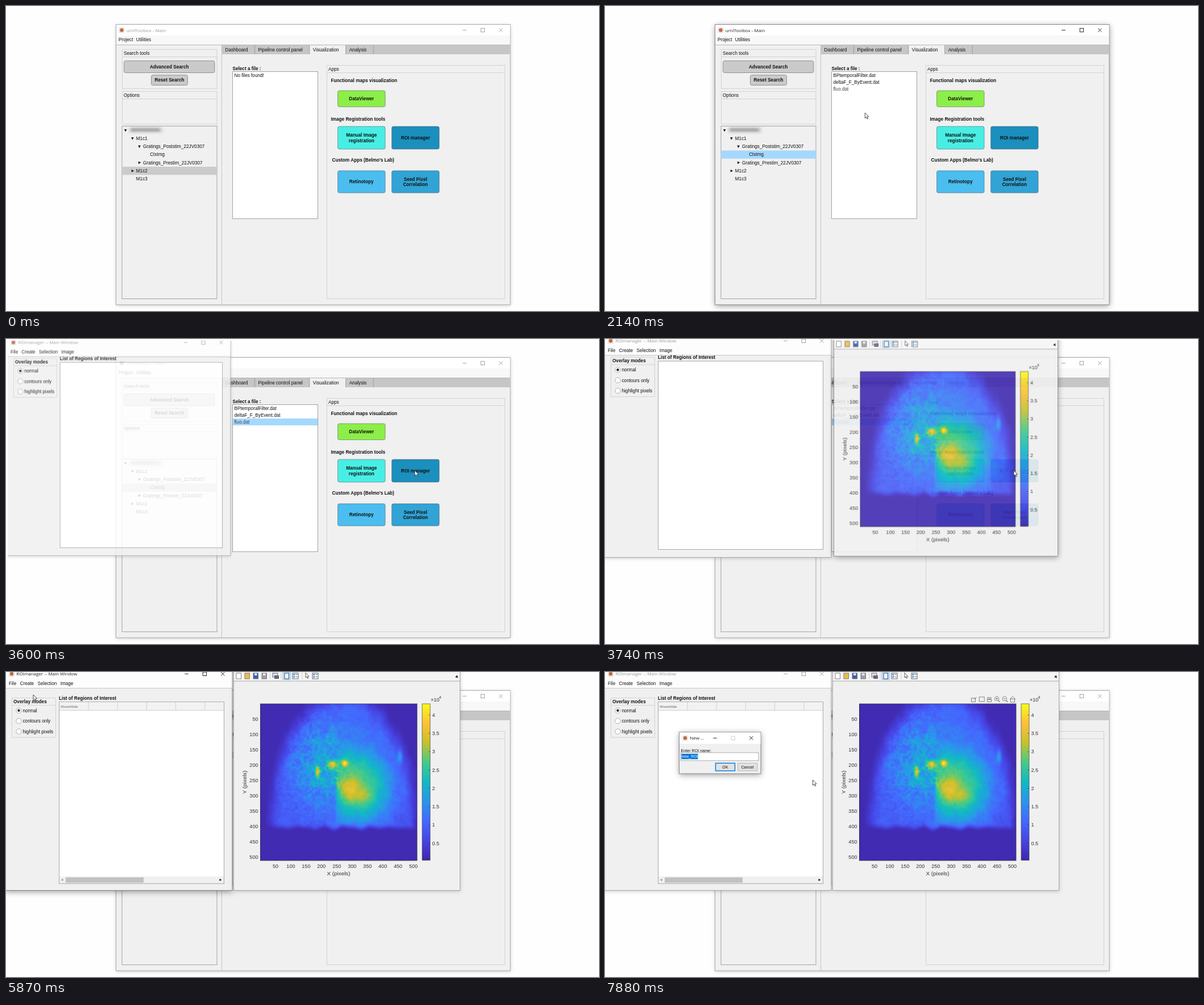
Write an HTML page with a canvas that moves like this. It is 1043 px wide and 537 px high and loops after 8000 ms.

```html
<!DOCTYPE html>
<html lang="en">
<head>
<meta charset="utf-8">
<title>Region manager walkthrough</title>
<style>
html, body { margin: 0; width: 100%; height: 100%; overflow: hidden; background: #fefefe; }
canvas { display: block; }
</style>
</head>
<body>
<canvas id="stage" width="1043" height="537"></canvas>
<script>
const W = 1043, H = 537, LOOP = 8000;
const SANS = '"Liberation Sans", Arial, sans-serif';
const TITLE = '"Open Sans", "Noto Sans", sans-serif';
const screen = document.getElementById('stage').getContext('2d');
const layer = makeCanvas(W, H).getContext('2d');
let c = screen;

// Moments (ms) at which the interface reacts.
const PICK_ROW = 1450, FILES_SHOWN = 1790, PICK_FILE = 2620, OPEN_MANAGER = 3480, OPEN_FIGURE = 3605,
  TABLE_READY = 3950, FOCUS_MANAGER = 5060, FOCUS_FIGURE = 6250, OPEN_DIALOG = 6480;
const within = (t, from, to) => t >= from && t < to;

function makeCanvas(w, h) {
  return Object.assign(document.createElement('canvas'), { width: w, height: h });
}
const clamp = v => Math.max(0, Math.min(1, v));
const smooth = v => { v = clamp(v); return v * v * (3 - 2 * v); };
const mix = (a, b, p) => a + (b - a) * p;

// ---------- drawing helpers (boxes are x, y, width, height) ----------
function fill(x, y, w, h, color) {
  c.fillStyle = color;
  c.fillRect(x, y, w, h);
}
function box(x, y, w, h, edge, color, width = 1) {
  if (color) fill(x, y, w, h, color);
  c.strokeStyle = edge;
  c.lineWidth = width;
  c.strokeRect(x, y, w, h);
}
function line(x0, y0, x1, y1, color, width = 1) {
  c.beginPath();
  c.moveTo(x0, y0);
  c.lineTo(x1, y1);
  c.strokeStyle = color;
  c.lineWidth = width;
  c.stroke();
}
// Small solid triangle pointing along an angle.
function arrow(x, y, angle, color = '#111', r = 2.8) {
  c.beginPath();
  for (const turn of [0, 2.2, -2.2]) c.lineTo(x + r * Math.cos(angle + turn), y + r * Math.sin(angle + turn));
  c.fillStyle = color;
  c.fill();
}
function circle(x, y, r, color, edge) {
  c.beginPath();
  c.arc(x, y, r, 0, 7);
  if (color) { c.fillStyle = color; c.fill(); }
  if (edge) { c.strokeStyle = edge; c.lineWidth = 0.8; c.stroke(); }
}
function text(str, x, y, { size = 8.2, bold = false, color = '#111', align = 'left', font = SANS } = {}) {
  c.font = `${bold ? 'bold ' : ''}${size}px ${font}`;
  c.textAlign = align;
  c.fillStyle = color;
  c.fillText(str, x, y + size * 0.35);
  return c.measureText(str).width;
}
function menu(x, y, gap, labels) {
  for (const label of labels) x += text(label, x, y) + gap;
}
function button(x, y, w, h, color, ...labels) {
  c.beginPath();
  c.roundRect(x, y, w, h, 3);
  c.fillStyle = color;
  c.fill();
  c.strokeStyle = 'rgba(80,90,100,.55)';
  c.lineWidth = 1;
  c.stroke();
  const first = y + h / 2 - (labels.length - 1) * 4.8;
  labels.forEach((s, i) => text(s, x + w / 2, first + i * 9.6, { bold: true, align: 'center' }));
}
function panel(x, y, w, h, title, bold) {
  box(x, y, w, h, '#d2d2d2');
  line(x, y + 13, x + w, y + 13, '#d2d2d2');
  text(title, x + 2.5, y + 6.5, { bold });
}
function windowBase(x, y, w, h, active) {
  c.save();
  c.shadowColor = `rgba(0,0,0,${active ? 0.4 : 0.22})`;
  c.shadowBlur = active ? 10 : 6;
  c.shadowOffsetY = active ? 2 : 1;
  fill(x, y, w, h, '#f0f0f0');
  c.restore();
  box(x, y, w, h, active ? '#888' : '#aaa');
}
function titleBar(x, y, title, buttonsX, active, maxColor) {
  const color = active ? '#111' : '#999', r = 3.2, gap = 31.9, cx = buttonsX + 2 * gap;
  fill(x - 5, y - 5, 10, 10, '#e4e8ee');
  circle(x, y, 3.2, '#c9693a');
  text(title, x + 8.3, y + 0.3, { size: 8, font: TITLE, color: active ? '#222' : '#999' });
  line(buttonsX - r, y, buttonsX + r, y, color, 0.9);
  box(buttonsX + gap - r, y - r, 2 * r, 2 * r, maxColor || color, null, 0.9);
  line(cx - r, y - r, cx + r, y + r, color, 0.9);
  line(cx - r, y + r, cx + r, y - r, color, 0.9);
}

// ---------- main window ----------
const TREE_TOP = 211.5, ROW = 14.3;
const tree = [
  { label: '', depth: 0, open: true },
  { label: 'M1c1', depth: 1, open: true },
  { label: 'Gratings_Poststim_22JV0307', depth: 2, open: true },
  { label: 'CtxImg', depth: 3 },
  { label: 'Gratings_Prestim_22JV0307', depth: 2, open: false },
  { label: 'M1c2', depth: 1, open: false },
  { label: 'M1c3', depth: 1 }
];
function drawTree(t, mouse) {
  const picked = t < PICK_ROW ? 5 : 3;
  const over = within(mouse.x, 204, 371) ? Math.floor((mouse.y - TREE_TOP) / ROW) : -1;
  const pickedColor = within(t, PICK_ROW, PICK_FILE) ? '#a5d8fe' : '#cbcbcb';
  box(204, TREE_TOP, 167, 304, '#a2a2a2');
  tree.forEach(({ label, depth, open }, i) => {
    const top = TREE_TOP + i * ROW, y = top + ROW / 2, x = 216.6 + depth * 12.2;
    if (i === picked || i === over) fill(204.5, top, 166, ROW, i === picked ? pickedColor : '#dcdcdc');
    if (open !== undefined) arrow(x - 6.4, y, open ? Math.PI / 2 : 0);
    text(label, x, y);
  });
  c.save();
  c.filter = 'blur(2px)';
  fill(217, 214, 58, 9, '#d2d2d2');
  fill(220, 216, 50, 4, '#949494');
  c.restore();
}
function drawTabs() {
  fill(380, 69, 506.5, 16, '#c6c6c6');
  let x = 380;
  for (const label of ['Dashboard', 'Pipeline control panel', 'Visualization', 'Analysis']) {
    c.font = `8.2px ${SANS}`;
    const width = c.measureText(label).width + 18;
    if (label === 'Visualization') fill(x, 69, width, 17, '#f0f0f0');
    text(label, x + 5.5, 77);
    x += width;
    line(x - 0.5, 69, x - 0.5, 85, '#9c9c9c');
  }
}
function drawFiles(t) {
  const border = within(t, PICK_FILE, OPEN_MANAGER) ? '#3fa9ee' : '#a2a2a2';
  const files = t < FILES_SHOWN ? ['No files found!'] : ['BPtemporalFilter.dat', 'deltaF_F_ByEvent.dat', 'fluo.dat'];
  text('Select a file :', 398.5, 110.5, { bold: true });
  box(398.5, 115.5, 150, 259, border, '#fff');
  if (t > PICK_FILE) fill(399, 140, 149, 12, '#a5d8fe');
  files.forEach((name, i) => text(name, 401.5, 122 + i * 12.1, { color: i === 2 ? '#444' : '#111' }));
}
function drawMain(t, mouse) {
  windowBase(193.5, 32.5, 693.5, 493.5, within(t, PICK_ROW, OPEN_MANAGER));
  fill(194, 33, 692.5, 19, '#fff');
  fill(194, 52, 692.5, 16, '#f8f8f8');
  titleBar(203.5, 42.5, 'umIToolbox - Main', 806.5, within(t, PICK_ROW, OPEN_MANAGER));
  menu(198, 59.5, 5.3, ['Project', 'Utilities']);
  line(194, 68.5, 886, 68.5, '#b8b8b8');

  panel(204.5, 76.5, 166.5, 69, 'Search tools');
  button(207.5, 96.5, 159.5, 21, '#cacaca', 'Advanced Search');
  button(255.5, 121.5, 64, 18, '#cacaca', 'Reset Search');
  panel(204.5, 150.5, 166.5, 57.5, 'Options');
  drawTree(t, mouse);
  line(379.5, 69, 379.5, 526, '#c4c4c4');
  drawTabs();
  drawFiles(t);

  panel(564.5, 104.5, 313, 411, 'Apps');
  const heading = (s, x, y) => text(s, x, y, { bold: true });
  const app = (column, y, h, color, ...labels) => button(583.5 + column * 95, y, 83.5, h, color, ...labels);
  const overManager = within(mouse.x, 678, 762) && within(mouse.y, 212, 252) && t < OPEN_MANAGER;
  heading('Functional maps visualization', 571.5, 131.5);
  app(0, 149, 28.5, '#8cee49', 'DataViewer');
  heading('Image Registration tools', 571.5, 199);
  app(0, 212, 40, '#48eee4', 'Manual Image', 'registration');
  app(1, 212, 40, overManager ? '#55a9cc' : '#1b8fbd', 'ROI manager');
  heading("Custom Apps (Belmo's Lab)", 573.5, 271.5);
  app(0, 290, 39, '#4bbdef', 'Retinotopy');
  app(1, 290, 39, '#31a3d5', 'Seed Pixel', 'Correlation');
}

// ---------- list window ----------
function drawTable() {
  fill(94, 53, 289, 14.5, '#f2f2f2');
  line(94, 67.5, 383, 67.5, '#d0d0d0');
  for (let x = 145; x < 383; x += 51.2) line(x, 53, x, 67, '#d0d0d0');
  text('Show/Hide', 96, 60.5, { size: 6, bold: true, color: '#888' });
  fill(94, 360, 289, 12, '#f0f0f0');
  fill(105, 361.5, 137, 9.5, '#c1c1c1');
  arrow(99, 366, Math.PI, '#999', 2.5);
  arrow(377, 366, 0, '#111', 2.5);
}
function drawManager(t) {
  const table = t > TABLE_READY, dy = table ? 13.6 : 0;
  windowBase(-2, -12, 400, 396.5, within(t, FOCUS_MANAGER, FOCUS_FIGURE));
  fill(0, 0, 397.5, 28, '#fdfdfd');
  line(0, 28.5, 398, 28.5, '#c8c8c8');
  titleBar(10, 3.3, 'ROImanager -- Main Window', 317.5, within(t, FOCUS_MANAGER, FOCUS_FIGURE));
  menu(5, 20, 6.4, ['File', 'Create', 'Selection', 'Image']);

  panel(10.5, 32 + dy, 77, 69.5, 'Overlay modes', true);
  ['normal', 'contours only', 'highlight pixels'].forEach((label, i) => {
    const y = 54.2 + dy + i * 18.5;
    circle(22.5, y, 4.7, '#fff', '#999');
    if (i === 0) circle(22.5, y, 2.2, '#222');
    text(label, 29.5, y);
  });
  text('List of Regions of Interest', 93, 32.5 + dy, { bold: true });
  box(93.5, 39 + dy, 290, table ? 320 : 331.5, '#a8a8a8', '#fff');
  if (table) drawTable();
}

// ---------- heat map ----------
const MAP = { x: 447, y: 56, size: 276 };
const colors = ['#3e26a8', '#4743e3', '#4368fd', '#2b94ec', '#10b9c4', '#45ca88', '#c6c12c', '#fec038', '#f9fb15'];
function colorRamp(ctx, x0, y0, x1, y1) {
  const ramp = ctx.createLinearGradient(x0, y0, x1, y1);
  colors.forEach((color, i) => ramp.addColorStop(i / (colors.length - 1), color));
  return ramp;
}
function hash(x, y) {
  const s = Math.sin(x * 127.1 + y * 311.7) * 43758.5453;
  return s - Math.floor(s);
}
function noise(x, y) {
  const i = Math.floor(x), j = Math.floor(y), u = smooth(x - i), v = smooth(y - j);
  return mix(mix(hash(i, j), hash(i + 1, j), u), mix(hash(i, j + 1), hash(i + 1, j + 1), u), v) - 0.5;
}
const bump = (x, y, cx, cy, rx, ry = rx) => Math.exp(-(((x - cx) / rx) ** 2) - ((y - cy) / ry) ** 2);
const rings = Array.from({ length: 9 }, (_, i) => ({
  x: 540 + 90 * (hash(i, 1) - 0.5), y: 165 + 110 * (hash(i, 2) - 0.5), r: 4 + 4 * hash(i, 3)
}));

function brightness(x, y) {
  const edge = Math.hypot((x - 592) / 130, Math.max(0, 250 - y) / 215) + noise(x / 9, y / 20) * 0.05;
  const dome = smooth((1.07 - edge) / 0.24), floor = smooth((280 - y + noise(x / 16, 1) * 6) / 14);
  const left = bump(x, y, 545, 165, 45, 75);
  // a broad glow, a textured left half and a bright disc with a sharp left edge
  let v = 0.16 + 0.17 * bump(x, y, 598, 165, 85, 95) + 0.1 * left;
  const disc = Math.hypot((x - 622) / 56, (y - 207) / 63);
  v += 0.29 * Math.exp(-(disc ** 3.2)) * smooth((x - 577) / 7);
  v += 0.17 * bump(x, y, 604, 205, 17, 22) + 0.13 * bump(x, y, 625, 218, 22, 16);
  v += 0.42 * (bump(x, y, 574, 162, 8) + bump(x, y, 547, 174, 4, 10) + bump(x, y, 595, 160, 6));
  v += 0.3 * bump(x, y, 693, 148, 4, 11);
  for (const ring of rings) {
    const gap = Math.hypot(x - ring.x, y - ring.y) - ring.r;
    v += 0.08 * Math.exp(-gap * gap);
  }
  v += 0.05 * noise(x / 14, y / 14) + (0.04 + 0.14 * left) * (noise(x / 5, y / 5) + 0.7 * noise(x / 2.5, y / 2.5));
  v += 0.7 * left * Math.max(0, noise(x / 6 + 9, y / 6) - 0.3);
  return 0.02 + dome * floor * v;
}
function paintHeatMap() {
  const palette = makeCanvas(256, 1).getContext('2d');
  palette.fillStyle = colorRamp(palette, 0, 0, 256, 0);
  palette.fillRect(0, 0, 256, 1);
  const shades = palette.getImageData(0, 0, 256, 1).data;
  const canvas = makeCanvas(MAP.size, MAP.size), g = canvas.getContext('2d');
  const img = g.createImageData(MAP.size, MAP.size);
  for (let y = 0; y < MAP.size; y++)
    for (let x = 0; x < MAP.size; x++) {
      const shade = Math.round(255 * clamp(brightness(x + MAP.x, y + MAP.y)));
      img.data.set(shades.subarray(shade * 4, shade * 4 + 4), (y * MAP.size + x) * 4);
    }
  g.putImageData(img, 0, 0);
  return canvas;
}
const heatMap = paintHeatMap();

// ---------- figure window ----------
function drawToolbar() {
  fill(401, 0, 397, 16, '#f5f5f5');
  line(401, 16, 798, 16, '#a5a5a5');
  ['#fff', '#e8bd4a', '#3f5fa8', '#a0a0a0'].forEach((color, i) => {
    const x = 405 + i * 15;
    box(x, 2, 8.5, 10, '#667', color, 0.8);
    if (i > 1) fill(x + 2, 2.5, 4.5, 3.5, '#e6ebf4');
  });
  box(469, 2, 9, 7, '#567', '#dde', 0.9);
  fill(472, 6, 8, 6, '#667');
  box(487, -1, 13.5, 14.5, '#8bbce0', '#cce4f7', 0.8);
  box(490, 2, 7.5, 10, '#246', '#eef4fa', 0.9);
  for (const x of [504, 539]) {
    box(x, 2, 10, 10, '#456', '#fff', 0.9);
    for (const y of [4.5, 8.5]) {
      fill(x + 1.5, y - 1, 2.5, 2.5, '#3579c8');
      line(x + 5, y, x + 9, y, '#555', 0.8);
    }
  }
  for (const x of [464.5, 484, 521]) line(x, 1, x, 13, '#c4c4c4', 0.8);
  drawPointer({ x: 527, y: 1.5 }, 0.9);
  arrow(793, 8.5, Math.PI / 4, '#222', 3);
}
function drawAxesTools() {
  const gray = '#777', slot = i => 648.5 + i * 13.7;
  box(slot(0) - 4, 46, 7, 6.5, gray, null, 0.9);
  line(slot(0), 49, slot(0) + 5, 44, gray);
  box(slot(1) - 4, 44, 9, 8, gray, null, 0.9);
  for (let i = 0; i < 4; i++) line(slot(2) - 3 + i * 2, 44, slot(2) - 3 + i * 2, 49, gray, 0.9);
  box(slot(2) - 3.5, 48.5, 7, 4, gray, null, 0.9);
  for (const i of [3, 4]) {
    circle(slot(i) - 0.5, 47, 3.8, null, gray);
    line(slot(i) + 2, 50, slot(i) + 5, 53, gray, 1.2);
    line(slot(i) - 2.5, 47, slot(i) + 1.5, 47, gray, 0.9);
  }
  line(slot(3) - 0.5, 45, slot(3) - 0.5, 49, gray, 0.9);
  for (const side of [-5, 5]) line(slot(5), 43, slot(5) + side, 48, gray, 0.9);
  box(slot(5) - 3.5, 47.5, 7, 5.5, gray, null, 0.9);
}
function drawFigure(t) {
  const right = MAP.x + MAP.size, bottom = MAP.y + MAP.size;
  windowBase(400.5, -40, 398, 424.5, t < FOCUS_MANAGER || within(t, FOCUS_FIGURE, OPEN_DIALOG));
  drawToolbar();
  c.drawImage(heatMap, MAP.x, MAP.y);
  box(MAP.x + 0.5, MAP.y, MAP.size - 0.5, MAP.size, '#333', null, 0.7);

  const tick = { size: 9.1, color: '#333' }, axis = { size: 9.9, color: '#333', align: 'center' };
  for (let n = 50; n <= 500; n += 50) {
    const d = n / 512 * MAP.size;
    text(n, MAP.x + d, 342, { ...tick, align: 'center' });
    text(n, 443.5, MAP.y + d, { ...tick, align: 'right' });
    line(MAP.x + d, bottom, MAP.x + d, bottom - 3, '#333', 0.7);
    line(MAP.x, MAP.y + d, MAP.x + 3, MAP.y + d, '#333', 0.7);
  }
  text('X (pixels)', (MAP.x + right) / 2, 355, axis);
  c.save();
  c.translate(420, (MAP.y + bottom) / 2);
  c.rotate(-Math.PI / 2);
  text('Y (pixels)', 0, 0, axis);
  c.restore();

  box(732, MAP.y, 14, MAP.size - 0.5, '#444', colorRamp(c, 0, bottom, 0, MAP.y), 0.7);
  for (let n = 0.5; n <= 4; n += 0.5) {
    const y = 333.8 - n * 64.5;
    text(n, 749.5, y, tick);
    line(743.5, y, 746, y, '#333', 0.7);
  }
  text('×10', 747, 48.5, tick);
  text('4', 761.5, 45, { size: 7, color: '#333' });
  if (t > FOCUS_FIGURE) drawAxesTools();
}

// ---------- name dialog ----------
function drawDialog() {
  const small = { size: 7.15 }, centered = { ...small, align: 'center' };
  windowBase(130.5, 106, 143.5, 73, true);
  fill(131, 106.5, 142.5, 20, '#fff');
  titleBar(141, 116.3, 'New ...', 193.5, true, '#ccc');
  text('Enter ROI name:', 133.5, 138, small);
  box(133.5, 142, 136.5, 14, '#999', '#fff', 0.8);
  fill(134.5, 144, 29, 9.5, '#0078d7');
  text('new_ROI', 134.5, 149, { size: 7, color: '#fff' });
  box(194.5, 160.5, 34, 13.5, '#0078d7', '#e1e1e1', 1.4);
  text('OK', 211.5, 167.5, centered);
  box(233.5, 160.5, 34.5, 13.5, '#adadad', '#e1e1e1', 0.8);
  text('Cancel', 250.5, 167.5, centered);
}

// ---------- pointer ----------
const START = { x: 728, y: 484 };
const moves = [
  { from: 60, to: 860, x: 290, y: 272 },
  { from: 860, to: 1240, x: 265, y: 252.5 },
  { from: 1240, to: PICK_ROW, x: 268, y: 259 },
  { from: 1780, to: 2200, x: 468, y: 184 },
  { from: 2200, to: 2480, x: 432, y: 146 },
  { from: 2680, to: 3130, x: 719, y: 231.5 },
  { from: 3900, to: 4140, x: 711, y: 145 },
  { from: 4140, to: 4740, x: 22, y: 30.5 },
  { from: 4800, to: 4970, x: 34, y: 18 },
  { from: 5350, to: 5800, x: 48, y: 40 },
  { from: 5920, to: 6600, x: 677, y: 266 },
  { from: 6700, to: 7400, x: 365.5, y: 190 }
];
function pointerAt(t) {
  let { x, y } = START;
  for (const move of moves) {
    const p = smooth((t - move.from) / (move.to - move.from));
    x = mix(x, move.x, p);
    y = mix(y, move.y, p);
  }
  return { x, y };
}
const pointerShape = new Path2D('M0 0V9.4L2.2 7.5L3.7 10.9L5.2 10.2L3.8 7L6.6 6.8Z');
function drawPointer({ x, y }, scale = 1) {
  c.save();
  c.translate(x, y);
  c.scale(scale, scale);
  c.fillStyle = '#fff';
  c.fill(pointerShape);
  c.strokeStyle = '#222';
  c.lineWidth = 0.8;
  c.stroke(pointerShape);
  c.restore();
}

// Fades and grows a window in around its centre.
function opening(t, start, cx, cy, draw) {
  if (t < start) return;
  const p = 1 - (1 - clamp((t - start) / 200)) ** 2, scale = 0.9 + 0.1 * p;
  if (p === 1) return draw(t);
  layer.clearRect(0, 0, W, H);
  c = layer;
  draw(t);
  c = screen;
  c.save();
  c.globalAlpha = p;
  c.translate(cx, cy);
  c.scale(scale, scale);
  c.drawImage(layer.canvas, -cx, -cy);
  c.restore();
}

function render(t) {
  const mouse = pointerAt(t);
  fill(0, 0, W, H, '#fefefe');
  drawMain(t, mouse);
  opening(t, OPEN_MANAGER, 199, 180, drawManager);
  opening(t, OPEN_FIGURE, 599, 180, drawFigure);
  opening(t, OPEN_DIALOG, 202, 142, drawDialog);
  if (t > 60) drawPointer(mouse);
}
const start = performance.now();
(function tick() {
  render((performance.now() - start) % LOOP);
  requestAnimationFrame(tick);
})();
</script>
</body>
</html>
```
